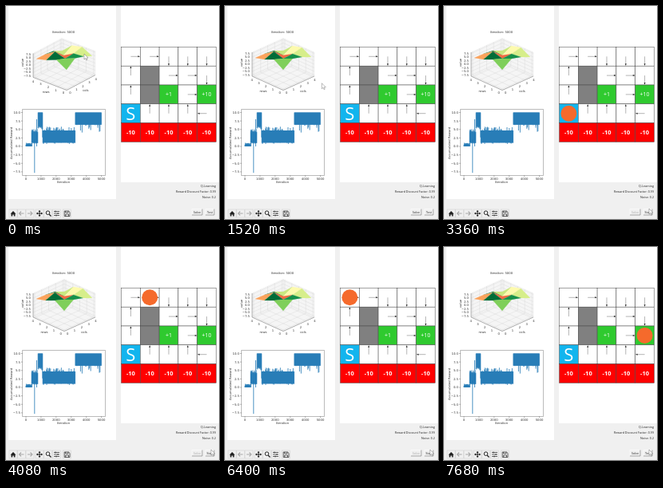
Write an HTML page that moves like this. It is 267x267 px and loops after 8000 ms.

```html
<!DOCTYPE html>
<html lang="en">
<head>
<meta charset="utf-8">
<title>Grid world learning</title>
<style>
html, body { margin: 0; width: 100%; height: 100%; overflow: hidden; background: #f0f0f0; }
svg { display: block; width: 100vw; height: 100vh; }
.plot { font: 3.8px "DejaVu Sans", sans-serif; fill: #333; }
.ui { font: 3.7px "Open Sans", "Noto Sans", sans-serif; fill: #222; }
.tile { font: 7px "Open Sans", "Noto Sans", sans-serif; fill: #fff; }
</style>
</head>
<body>
<svg viewBox="0 0 267 267">
  <path fill="#fff" d="M3 0H138V242H3ZM144 0H267V221H144Z"/>
  <g id="surface" class="plot"></g>
  <g id="chart" class="plot"></g>
  <g id="world"></g>
  <circle id="agent" r="10" fill="#f56a2c"/>
  <g id="info" class="ui"></g>
  <g id="tools" fill="none" stroke="#222"></g>
  <path id="cursor" d="M0 0V7L1.7 5.5L2.8 8L3.9 7.5L2.8 5.1H5Z" fill="#fff" stroke="#555" stroke-width=".4"/>
</svg>
<script>
const LOOP = 8000;
const $ = id => document.getElementById(id);
const path = (d, stroke, width = .4, fill = "none") =>
  `<path d="${d}" fill="${fill}" stroke="${stroke}" stroke-width="${width}"/>`;
const line = (points, close = "") => "M" + points.map(p => p.map(n => n.toFixed(2))).join("L") + close;
const text = (x, y, s, anchor = "middle", extra = "") =>
  `<text x="${x}" y="${y}" text-anchor="${anchor}" ${extra}>${s}</text>`;
const rect = (x, y, w, h, fill, extra = "") =>
  `<rect x="${x}" y="${y}" width="${w}" height="${h}" fill="${fill}" ${extra}/>`;

// Value surface: a runs front to left, b front to right
const heights = [[.59, 1.17, .95, .6], [1.1, .82, .87, 1.05], [.75, 1.07, .39, .83], [.53, .52, .43, .07]];
const facets = [
  ["#7fcf5a", "#16914a", "#d6ee8a"],
  ["#006d38", "#f26b42", "#fdfaae"],
  ["#fba35c", "#0d8043", "#c9e880"]
];

function drawSurface(turn) {
  const c = Math.cos(turn), s = Math.sin(turn);
  const at = (a, b, z) => {
    const p = b - a, q = -a - b;
    return [73 + 19.5 * (p * c - q * s), 73 + 8.8 * (p * s + q * c) - 15 * z];
  };
  const pane = (...corners) => path(line(corners.map(k => at(...k)), "Z"), "#ddd", .3, "#f5f5f5");
  let out = pane([-1, -1, -1], [1, -1, -1], [1, 1, -1], [-1, 1, -1])
    + pane([1, -1, -1], [1, 1, -1], [1, 1, 1], [1, -1, 1])
    + pane([-1, 1, -1], [1, 1, -1], [1, 1, 1], [-1, 1, 1]);
  for (let i = 0; i < 5; i++) {
    const k = -.9 + i * .45;
    out += path(line([at(k, -1, -1), at(k, 1, -1), at(k, 1, 1)]), "#ccc", .3)
      + path(line([at(-1, k, -1), at(1, k, -1), at(1, k, 1)]), "#ccc", .3);
    const [lx, ly] = at(k, -1.12, -1), [rx, ry] = at(-1.12, k, -1);
    out += text(lx, ly + 4.5, i) + text(rx, ry + 4.5, i);
  }
  for (let i = -3; i <= 3; i++) {
    out += path(line([at(1, -1, i * .3), at(1, 1, i * .3), at(-1, 1, i * .3)]), "#ccc", .3);
    const [x, y] = at(1, -1, i * .3);
    out += text(x - 3, y + 1, (i * 2.5).toFixed(1).replace("-", "−"), "end");
  }
  out += path(line([at(1, -1, 1), at(1, -1, -1), at(-1, -1, -1), at(-1, 1, -1)]), "#333", .35);
  const node = (i, j) => at(i * .6 - .9, j * .6 - .9, heights[i][j]);
  for (let i = 2; i >= 0; i--) for (let j = 2; j >= 0; j--) {
    const quad = [node(i, j), node(i + 1, j), node(i + 1, j + 1), node(i, j + 1)];
    out += path(line(quad, "Z"), facets[i][j], .2, facets[i][j]);
  }
  const [lx, ly] = at(0, -1.28, -1), [rx, ry] = at(-1.28, 0, -1);
  out += text(lx, ly + 9, "rows") + text(rx, ry + 9, "cols")
    + text(72, 33.8, "Iteration: 5000")
    + text(0, 0, "value", "middle", 'transform="translate(22 71) rotate(-90)"');
  $("surface").innerHTML = out;
}

function drawChart() {
  let seed = 7;
  const rnd = () => (seed = seed * 16807 % 2147483647) / 2147483647;
  const y = v => 176 - v * 4.25;
  let d = "";
  for (let x = 25; x < 119.5; x += .4) {
    let low, high;
    if (x < 32) [low, high] = [0, .5 + rnd() * .6];
    else if (x < 40) [low, high] = [.8 + rnd() * .4, 4 + rnd() * 1.2];
    else if (x < 46) [low, high] = [5 + rnd(), 10];
    else if (x < 87) [low, high] = [1.1, 4.7];
    else [low, high] = [6.4, 10];
    if (x > 40 && rnd() < .18) low -= rnd() * (x < 46 || x > 87 ? 2.5 : .4);
    if (x > 46 && x < 87 && rnd() < .25) high += rnd() * 1.2;
    d += `M${x.toFixed(1)} ${y(low).toFixed(1)}V${y(high).toFixed(1)}`;
  }
  d += `M35.8 ${y(2)}V${y(-7.8)}M32.6 ${y(4)}V${y(0)}M38.5 ${y(8)}V${y(0)}`;
  let out = path(d, "#1f77b4", .8) + path("M20.5 129.5H124.5V212.5H20.5Z", "#555", .4);
  for (let i = -3; i <= 4; i++) {
    const v = i * 2.5;
    out += path(`M19 ${y(v)}h1.5`, "#333") + text(18, y(v) + 1.4, v.toFixed(1).replace("-", "−"), "end");
  }
  for (let i = 0; i < 6; i++) {
    const x = 25 + i * 18.9;
    out += path(`M${x} 212.5v1.5`, "#333") + text(x, 218, i * 1000);
  }
  $("chart").innerHTML = out + text(72, 222.4, "Iteration")
    + text(0, 0, "Accumulated Reward", "middle", 'transform="translate(8 172) rotate(-90)"');
}

// Cells: arrows r/l/u/d, wall #, start S, prizes 1 and X, pit -
const CELL = 23.8, LEFT = 144.5, TOP = 51.4;
const rows = ["rrddd", "u#rrd", "u#1rX", "Suuul", "-----"];
const tiles = {
  "#": ["#808080", ""], S: ["#12b5ee", "S", "font-size:22px;font-weight:500", 8],
  1: ["#2fca2f", "+1", ""], X: ["#2fca2f", "+10", ""], "-": ["#f00", "-10", "font-size:7.5px;font-weight:700"]
};
const headings = { r: 0, d: 90, l: 180, u: 270 };
const center = (row, col) => [LEFT + (col + .5) * CELL, TOP + (row + .5) * CELL];

function drawWorld() {
  let out = "";
  rows.forEach((row, r) => [...row].forEach((key, c) => {
    const [x, y] = center(r, c), tile = tiles[key];
    out += rect(x - CELL / 2, y - CELL / 2, CELL, CELL, tile ? tile[0] : "#fff", 'stroke="#444" stroke-width=".5"');
    if (tile) out += text(x, y + (tile[3] || 2.5), tile[1], "middle", `class="tile" style="${tile[2]}"`);
    else out += `<g transform="translate(${x} ${y}) rotate(${headings[key]})">`
      + path("M0 0H11", "#444", .4) + path("M11.5 0L9 -1V1Z", "none", 0, "#222") + "</g>";
  }));
  $("world").innerHTML = out;
}

function drawTools() {
  const dark = "#222", pale = "#aaa";
  $("tools").innerHTML =
    [9, 19.5, 30, 42, 52.7, 63.5, 76.5].map(x => rect(x - 5, 255, 10, 10, "none", 'stroke="#ccc" stroke-width=".5"')).join("")
    + path("M5.5 260.5L9 257L12.5 260.5H11.5V263.5H9.8V261.5H8.2V263.5H6.5V260.5Z", "none", 0, dark)
    + path("M22.5 260H16.5M19 257.5L16.5 260L19 262.5", pale, 1.1)
    + path("M27 260H33M30.5 257.5L33 260L30.5 262.5", pale, 1.1)
    + path("M38.5 260H45.5M42 256.5V263.5", dark, 1)
    + path("M40.5 258L42 256L43.5 258ZM40.5 262L42 264L43.5 262ZM40 258.5L38 260L40 261.5ZM44 258.5L46 260L44 261.5Z", "none", 0, dark)
    + path("M54.2 261.2L56.5 263.5", dark, 1.3) + '<circle cx="52.5" cy="259.2" r="2.3"/>'
    + path("M60 257.5H67M60 260H67M60 262.5H67M62 256.5v2M65 259v2M63 261.5v2", dark, .7)
    + path("M73.2 257H78.5L80 258.4V263.5H73.2ZM74.7 257V259H78V257M74.7 263.5V261H78.5V263.5", dark, .7);
}

function drawInfo(running) {
  const button = (x, w, label, color) =>
    path(`M${x} 262V254.5H${x + w}`, "#fff", .6) + path(`M${x} 262H${x + w}V254.5`, "#777", .6)
    + text(x + w / 2, 259.7, label, "middle", `style="fill:${color}"`);
  $("info").innerHTML = text(263, 227, "Q-Learning", "end")
    + text(263, 234, "Reward Discount Factor: 0.99", "end")
    + text(263, 241, "Noise: 0.2", "end")
    + button(233, 13, "Solve", running ? "#aaa" : "#222")
    + button(250, 11, running ? "Stop" : "Test", "#222");
}

// Each run walks the route at a steady pace, then rests on the prize
const STEP = 177;
const route = [[3, 0], [2, 0], [1, 0], [0, 0], [0, 1], [0, 2], [1, 2], [1, 3], [1, 4], [2, 4]];
const runs = [{ start: 3280, end: 5280 }, { start: 5760, end: 7520 }];
const turnKeys = [[80, -.08], [640, -.01], [800, -.01], [960, 0]];
const cursorKeys = [[0, 98, 60], [640, 104, 57], [1360, 105, 57], [2000, 170, 215],
  [2160, 174, 240], [2400, 175, 249], [2640, 248, 255], [2880, 257, 254]];

function sample(keys, t) {
  const next = keys.findIndex(k => k[0] > t);
  if (next < 0) return keys[keys.length - 1].slice(1);
  if (next === 0) return keys[0].slice(1);
  const a = keys[next - 1], b = keys[next], f = (t - a[0]) / (b[0] - a[0]);
  return a.slice(1).map((v, i) => v + (b[i + 1] - v) * f);
}

let lastTurn, lastRunning;
function frame(now) {
  const t = now % LOOP;
  const [turn] = sample(turnKeys, t);
  if (turn !== lastTurn) drawSurface(lastTurn = turn);

  const run = runs.filter(r => t >= r.start).pop();
  const running = Boolean(run && t < run.end);
  if (running !== lastRunning) drawInfo(lastRunning = running);

  const agent = $("agent");
  agent.setAttribute("visibility", run ? "visible" : "hidden");
  if (run) {
    const step = Math.min(route.length - 1, Math.floor((t - run.start) / STEP));
    agent.setAttribute("transform", `translate(${center(...route[step])})`);
  }
  $("cursor").setAttribute("transform", `translate(${sample(cursorKeys, t)})`);
  requestAnimationFrame(frame);
}

drawChart();
drawWorld();
drawTools();
requestAnimationFrame(frame);
</script>
</body>
</html>
```
